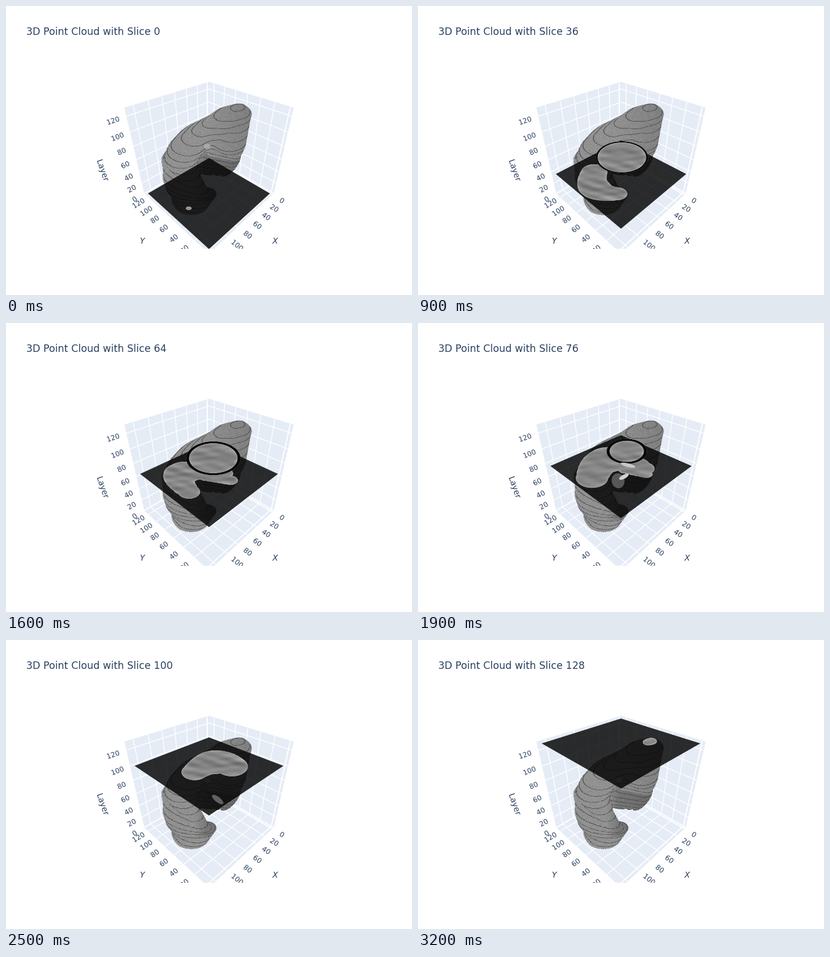
Write a matplotlib script that moves like this. It is 700 px wide and 500 px high and loops after 3300 ms.

```python
import numpy as np
import matplotlib.pyplot as plt
from matplotlib.animation import FuncAnimation
from matplotlib.collections import LineCollection
from matplotlib.patches import Ellipse, PathPatch, Polygon, Rectangle
from matplotlib.textpath import TextPath
from matplotlib.transforms import Affine2D

plt.rcParams["font.family"] = "DejaVu Sans"
W, H, DPI = 700, 500, 100
PX = 72 / DPI
INK, WALL = "#2a3f5f", "#e5ecf6"
FRAMES, STEP, TOP = 33, 4, 130
rng = np.random.default_rng(7)

fig = plt.figure(figsize=(W / DPI, H / DPI), dpi=DPI, facecolor="white")
ax = fig.add_axes([0, 0, 1, 1])
ax.axis("off")


# ---- camera: eye on the cube diagonal, 45 degree field of view ----
FOCAL = 160 / np.tan(np.pi / 8)


def project(p, q, z):
    """Cube coordinates to pixels; p runs to the left front, q to the right."""
    scale = FOCAL / (1.25 * 3 ** 0.5 - (p + q + z) / 3 ** 0.5)
    return (350 + (q - p) / 2 ** 0.5 * scale,
            260 - (2 * z - p - q) / 6 ** 0.5 * scale)


def height(z):
    return z / TOP - 0.5


def across(v):
    return v / 134.5 - 0.472


# ---- box, grid and labels ----
h = 0.5
SQUARE = [(-h, -h), (h, -h), (h, h), (-h, h)]
for axis in range(3):
    corners = [project(*np.insert(c, axis, -h)) for c in SQUARE]
    ax.add_patch(Polygon(corners, fc=WALL, ec=WALL, lw=0.5 * PX, zorder=1))

ticks = np.arange(0, 121, 20)
grid, widths = [], []
for t in ticks:
    u, z = across(t), height(t)
    for a, b in (((u, -h, -h), (u, h, -h)), ((u, -h, -h), (u, -h, h)),
                 ((-h, -u, -h), (h, -u, -h)), ((-h, -u, -h), (-h, -u, h)),
                 ((-h, -h, z), (h, -h, z)), ((-h, -h, z), (-h, h, z))):
        grid.append([project(*a), project(*b)])
        widths.append((2.0 if t == 0 else 1.4) * PX)
ax.add_collection(LineCollection(grid, colors="white", linewidths=widths, zorder=2))


def label(x, y, s, size, angle=0, style="normal"):
    """Text outline centred on a pixel; angle runs clockwise."""
    path = TextPath((0, 0), s, size=size, prop={"style": style})
    box = path.get_extents()
    place = (Affine2D().translate(-(box.x0 + box.x1) / 2, -(box.y0 + box.y1) / 2)
             .scale(1, -1).rotate_deg(angle).translate(x, y))
    ax.add_patch(PathPatch(place.transform_path(path), fc=INK, ec="none", zorder=3))


def tick_label(near, far, s):
    (x0, y0), (x1, y1) = project(*near), project(*far)
    label(x1, y1, s, 12, np.degrees(np.arctan((y1 - y0) / (x1 - x0))))


OUT = 0.62
for t in ticks:
    u, z = across(t), height(t)
    tick_label((u, h, -h), (u, OUT, -h), str(t))
    tick_label((h, -u, -h), (OUT, -u, -h), str(t))
    tick_label((h, -h, z), (OUT, -h, z), str(t))
label(464, 406, "X", 14, style="italic")
label(236, 406, "Y", 14, style="italic")
label(166.5, 285, "Layer", 14, 71)
ax.add_patch(Rectangle((0, 420), W, 80, fc="white", ec="none", zorder=20))
title = ax.text(35, 50, "", fontsize=17.1 * PX, color=INK, va="baseline", zorder=21)


# ---- organ: each layer is a thick arc on a pixel grid ----
FLAT = 0.62  # foreshortening of a circle
LEFT, RIGHT, UP, DOWN = 230, 470, 150, 380
gy, gx = np.mgrid[UP:DOWN, LEFT:RIGHT] + 0.5

# layer, arc start, middle and end, then the three radii
ARCS = np.array([
    (0, 315, 350, 315, 350, 315, 350, 29, 29, 29),
    (20, 324, 337, 318, 328, 313, 318, 29, 30, 28),
    (34, 344, 325, 308, 318, 303, 292, 19, 30, 24),
    (48, 338, 324, 293, 301, 308, 264, 13, 22, 17),
    (62, 318, 296, 300, 264, 372, 262, 18, 31, 17),
    (76, 300, 268, 330, 236, 390, 252, 28, 36, 18),
    (92, 312, 243, 350, 220, 385, 236, 30, 38, 29),
    (112, 345, 207, 372, 199, 396, 193, 12, 27, 26),
    (TOP, 403, 173, 403, 173, 403, 173, 24, 24, 24)])


def discs(xs, ys, rs):
    """Signed distance to a union of flattened discs, positive inside."""
    d = np.full(gx.shape, -99.0)
    for x, y, r in zip(xs, ys, rs):
        d = np.maximum(d, r - np.hypot(gx - x, (gy - y) / FLAT))
    return d


def dome(z, low, high):
    """Half ellipse over a range of layers."""
    return max(0, 1 - ((2 * z - low - high) / (high - low)) ** 2) ** 0.5


def main_part(z):
    v = [np.interp(z, ARCS[:, 0], col) for col in ARCS[:, 1:].T]
    start, mid, end = np.reshape(v[:6], (3, 2, 1))
    t = np.linspace(0, 1, 14)
    bend = 2 * mid - (start + end) / 2
    x, y = (1 - t) ** 2 * start + 2 * t * (1 - t) * bend + t ** 2 * end
    cap = np.clip(min((z + 0.3) / 10, (TOP - z) / 12), 0, 1) ** 0.5
    return discs(x, y, cap * np.interp(t, [0, 0.5, 1], v[6:]))


def core_part(z):
    return discs([344 + 0.21 * z], [298 - z], [46 * dome(z, 16, 84)])


def side_lobe(z):
    t, f = np.linspace(0, 1, 6), (z - 44) / 36
    x0, y0, x1, y1 = 325 + 35 * f, 284 - 34 * f, 376 + 20 * f, 290 - 32 * f
    return discs(x0 + (x1 - x0) * t, y0 + (y1 - y0) * t,
                 [13 * dome(z, 40, 86)] * 6)


def cover(d):
    return np.clip(d + 0.5, 0, 1)


def parts(z):
    """Outer tissue and, where present, the core."""
    outer = main_part(z)
    if 40 < z < 86:
        outer = np.maximum(outer, side_lobe(z))
    return outer, core_part(z) if 16 < z < 84 else None


def show(grey, alpha, zorder):
    rgba = np.dstack([grey, grey, grey, alpha])
    return ax.imshow(rgba, extent=(LEFT, RIGHT, DOWN, UP), aspect="auto",
                     interpolation="nearest", zorder=zorder)


def stack_layers():
    base = 0.57 - 0.07 * np.clip((gx - 340) / 80, 0, 1)
    grey, alpha = base.copy(), np.zeros(gx.shape)
    for z in range(TOP - 1):
        outer, core = parts(z)
        d = outer if core is None else np.maximum(outer, core)
        d = d + rng.normal(0, 0.15 if z > 90 else 0.4, gx.shape)
        c = cover(d)
        hollow = 0.1 * np.clip((gx - 325) / 20, 0, 1) * (30 < z < 76)
        tone = base - hollow + rng.normal(0, 0.025, gx.shape)
        grey = grey * (1 - c) + tone * c
        if z % 7 == 2:
            line = 0.75 * np.clip(1.2 - np.abs(d), 0, 1)
            grey = grey * (1 - line) + 0.24 * line
        alpha = np.maximum(alpha, c)
    return np.clip(grey, 0, 1), alpha


show(*stack_layers(), 5)
ax.add_patch(Ellipse((347, 243), 11, 9, fc="0.75", ec="none", alpha=0.6, zorder=7))

# ---- the moving slice ----
waves = [(*rng.normal(0, (0.14, 0.22, 0.08)), rng.uniform(0, 6.3)) for _ in range(9)]


def mottle(z):
    return sum(np.sin(a * gx + b * gy + c * z + d) for a, b, c, d in waves) / 3


def section(z):
    outer, core = parts(z)
    d, alpha = outer, cover(outer)
    dark = 0
    if core is not None:
        gap = cover(core + 3 + 2 * (z > 60))
        alpha = np.maximum(alpha, gap)
        dark = gap - cover(core)
        d = np.maximum(outer * (1 - gap), core)
    grey = 0.52 + 0.05 * mottle(z) + 0.1 * np.exp(-np.abs(d - 1) / 2)
    return np.clip(grey * (1 - dark) + 0.03 * dark, 0, 1), alpha


plane = ax.add_patch(Polygon([(0, 0)] * 4, fc=(0.01, 0.01, 0.01, 0.83),
                             ec="none", zorder=10))
slab = show(gx * 0, gx * 0, 11)

# vessels: layer, centre, radii, tilt, grey
VESSELS = [(48, 342, 310, 3.5, 2.2, 0, 0.85), (76, 345, 273, 11, 13, -10, 0.34),
           (76, 355, 266, 9, 3.5, -28, 0.82), (76, 362, 246, 13, 3.2, 14, 0.78),
           (92, 365, 276, 26, 10, 38, 0.38)]
spots = [ax.add_patch(Ellipse((x, y), 1, 1, angle=a, fc=str(g), ec="none", zorder=15))
         for _, x, y, _, _, a, g in VESSELS]

ax.set_xlim(0, W)
ax.set_ylim(H, 0)


def update(i):
    z = i * STEP
    title.set_text(f"3D Point Cloud with Slice {z}")
    plane.set_xy([project(0.944 * p, 0.944 * q, height(z)) for p, q in SQUARE])
    grey, alpha = section(z)
    slab.set_data(np.dstack([grey, grey, grey, alpha]))
    for spot, (layer, _, _, rx, ry, _, _) in zip(spots, VESSELS):
        s = dome(z, layer - 9, layer + 9)
        spot.set_visible(s > 0)
        spot.width, spot.height = 2 * rx * s, 2 * ry * s
    return ()


anim = FuncAnimation(fig, update, frames=FRAMES, interval=100, repeat=True)
plt.show()
```
